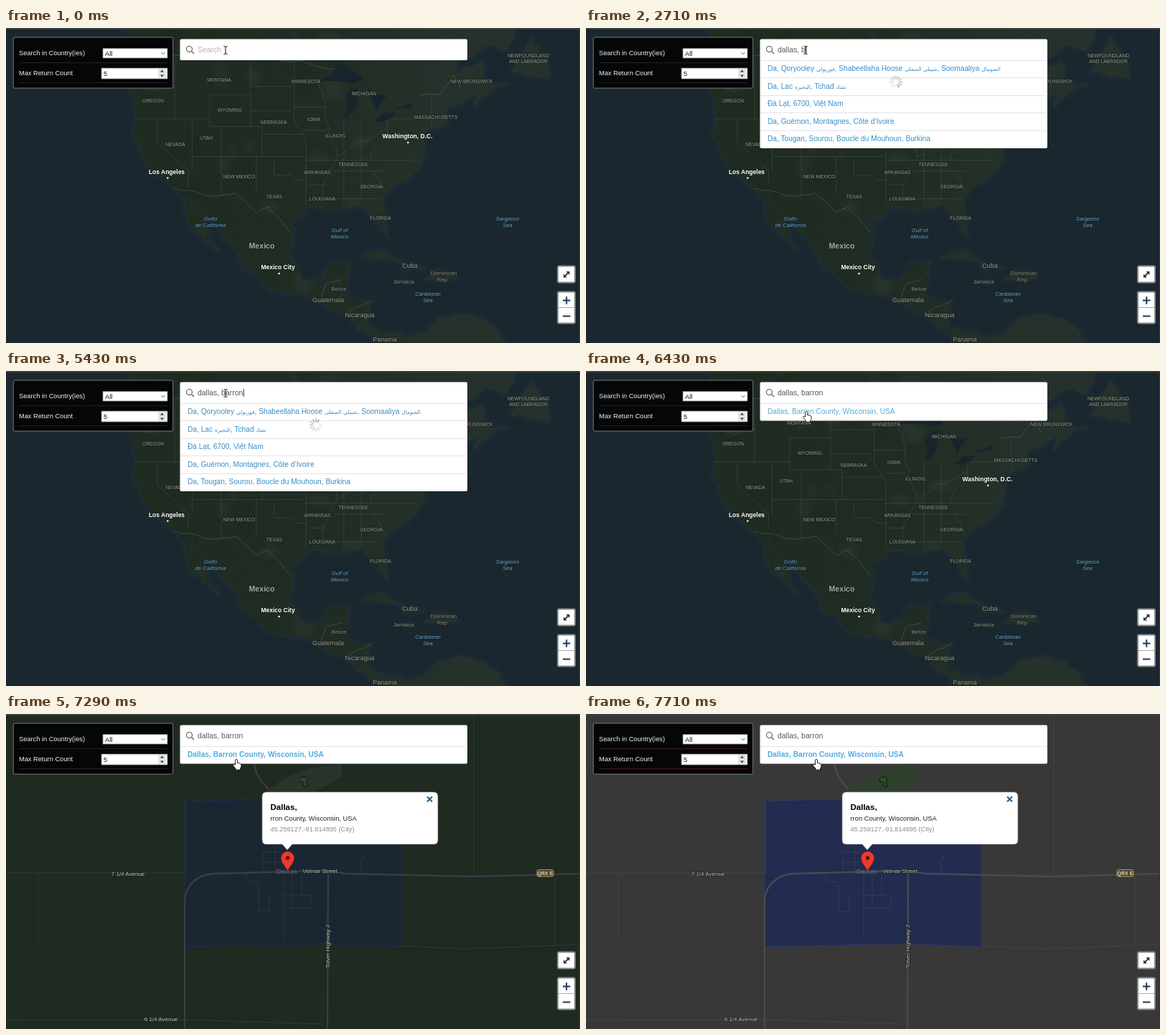
Write an HTML page that moves like this. It is 800x440 px and loops after 8.01 s.

```html
<!DOCTYPE html>
<html lang="en">
<head>
<meta charset="utf-8">
<title>Place search on a map</title>
<style>
html,body{margin:0;width:100%;height:100%;overflow:hidden;background:#1a272f}
svg{display:block;width:800px;height:440px;font-family:Arial,"Liberation Sans",sans-serif}
text{white-space:pre}
.mid{text-anchor:middle}
.halo text{paint-order:stroke;stroke:#1b241e;stroke-width:1.6px;stroke-linejoin:round}
.state{font-size:6.8px;fill:#969a97}
.city{font-size:8.5px;font-weight:bold;fill:#fff}
.country{font-size:10.6px;font-weight:bold;fill:#a3a6a0}
.nation{font-size:9px;fill:#969993}
.small{font-size:7.8px;fill:#858a86}
.sea{font-size:7.7px;font-style:italic;fill:#5fa0dc}
.road{font-size:8px;fill:#c3c6c4}
.row{font-size:10.2px;fill:#3a8fc6}
.arabic{font-family:"DejaVu Sans",sans-serif;font-size:7.5px}
.ui{font-size:9.25px;fill:#f2f2f2}
.line{stroke:#e4e4e7}
</style>
</head>
<body>
<svg viewBox="0 0 800 440">
  <defs>
    <linearGradient id="ground"><stop offset=".2" stop-color="#202b22"/><stop offset=".5" stop-color="#212d24"/><stop offset=".8" stop-color="#27312c"/></linearGradient>
    <filter id="soft" x="-50%" y="-50%" width="200%" height="200%"><feGaussianBlur stdDeviation="4"/></filter>
    <clipPath id="land"><path id="landClip"/></clipPath>
  </defs>
  <g id="continent"></g>
  <g id="town"></g>
  <path d="M0 1H800" stroke="#3b3d3e" stroke-width="2"/>
  <path d="M799.500 0V440" stroke="#30383a"/>

  <g id="popup">
    <path d="M363 109H596Q602 109 602 115V176Q602 182 596 182H399L392 190 385 182H363Q357 182 357 176V115Q357 109 363 109Z" fill="#fff" stroke="#777" stroke-width=".6"/>
    <text x="368.500" y="133.500" font-size="11.5" font-weight="bold">Dallas,</text>
    <text x="368.500" y="149" font-size="9.35" fill="#222">rron County, Wisconsin, USA</text>
    <text x="368.500" y="164" font-size="9.2" fill="#8b8b8b">45.259127,-91.814895 (City)</text>
    <path d="M587 115.500L594 122.500M594 115.500L587 122.500" stroke="#2f6389" stroke-width="2.2"/>
    <path d="M392.500 220C391 213 383.500 209 383.500 201A9 9 0 0 1 401.500 201C401.500 209 394 213 392.500 220Z" fill="#ee3a2d" stroke="#a92118" stroke-width=".6"/>
    <circle cx="392.500" cy="201" r="2.7" fill="#5c0f0c"/>
  </g>

  <rect x="10.200" y="13" width="222.500" height="71" rx="2" fill="#040607" stroke="#777b7d"/>
  <path id="rules" d="M18 48.500H225M18 76.500H225"/>
  <g class="ui">
    <text x="18" y="38">Search in Country(ies)</text><text x="18" y="66">Max Return Count</text>
    <path d="M135 28.500H225V42H135ZM133 56H225V71H133Z" fill="#fff" stroke="#777" stroke-width=".8"/>
    <path d="M212 57H223V70H212Z" fill="#e4e4e4"/>
    <path d="M216.500 34L219 36.500 221.500 34" fill="none" stroke="#555"/>
    <path d="M215 61.500L217.500 58.500 220 61.500ZM215 65.500L217.500 68.500 220 65.500Z" fill="#333"/>
    <text x="138" y="39" style="fill:#111">All</text><text x="136" y="67" style="fill:#111">5</text>
  </g>

  <rect id="sheet" x="242.500" y="15.500" width="400.500" rx="2" fill="#fff"/>
  <g fill="none" stroke="#555" stroke-width="1.1"><circle cx="255.500" cy="29.500" r="4"/><path d="M258.500 32.500L262 36"/></g>
  <text id="query" x="267" y="34" font-size="10.45"></text>
  <path id="caret" stroke="#222" stroke-width=".9"/>
  <g id="list" class="row"></g>
  <g id="match" class="row">
    <path d="M243 45.500H642" class="line"/>
    <text id="matchText" x="253" y="60">Dallas, Barron County, Wisconsin, USA</text>
  </g>
  <g id="spinner"></g>

  <g fill="#fff" stroke="#858a8c" stroke-width="2">
    <rect x="769" y="332.500" width="24" height="23" rx="2"/><rect x="769" y="368.500" width="24" height="44" rx="2"/>
  </g>
  <path d="M770 390.500H792" stroke="#aaa"/>
  <path d="M776 380.500H786.500M781.200 375.200V385.800M776 402.500H786.500" stroke="#1d3a55" stroke-width="2"/>
  <path d="M778 347.500L784.500 341" stroke="#333" stroke-width="1.800"/>
  <path d="M780.500 340H785.500V345ZM777 343.500V348.500H782Z" fill="#333"/>

  <path id="beam" d="M-2.500-5.500Q0-5.500 0-4Q0-5.500 2.500-5.500M0-4.500V4.500M-2.500 5.500Q0 5.500 0 4Q0 5.500 2.500 5.500" fill="none" stroke="#111"/>
  <path id="hand" d="M-1.500 8V1Q0-1 1.500 1V5.500Q2.800 4.400 3.700 6Q5 5.300 5.600 6.700Q7.200 6.500 7 9Q7 11.500 5.500 13V15H-1V13L-4.600 9Q-4.800 6.800-3 7Z" fill="#fff" stroke="#111" stroke-width=".9"/>
</svg>
<script>
const $ = id => document.getElementById(id);
let seed = 7;
const random = () => (seed = seed * 16807 % 2147483647) / 2147483647;
const repeat = (n, make) => Array.from({length: n}, (_, i) => make(i)).join('');

// Web Mercator; points are "degrees west,degrees north"
const project = point => {
  const [west, north] = point.split(',').map(Number);
  return [1186.3 - 8.13 * west, 503.8 - 465.8 * Math.log(Math.tan(Math.PI * (.25 + north / 360)))];
};
// Midpoint displacement turns a straight leg into a natural coast or river
const wander = (a, b, rough) => {
  const dx = b[0] - a[0], dy = b[1] - a[1];
  if (!rough || Math.hypot(dx, dy) < 5) return [b];
  const push = (random() - .5) * rough;
  const mid = [(a[0] + b[0]) / 2 - dy * push, (a[1] + b[1]) / 2 + dx * push];
  return [...wander(a, mid, rough), ...wander(mid, b, rough)];
};
const trace = (lines, rough, end = '') => lines.split('|').map(line => {
  const points = line.trim().split(/\s+/).map(project);
  const full = points.flatMap((p, i) => i ? wander(points[i - 1], p, rough) : [p]);
  return 'M' + full.map(p => p.map(v => v.toFixed(1)).join(' ')).join('L') + end;
}).join('');

const mainland = `128,55 124.5,48 124.3,40.4 120.6,34.6 117.2,32.7 114.8,28 112,25 109.5,23.1 111.5,26.5 114.8,31.7
  109.3,26.3 105.5,21 102,18 95,16 87.5,12.9 83,8.3 80,7.3 78.5,8.8 77.8,3 58,3 62,10.6 71.5,12 77.2,8.6 79.6,9.6
  83.5,10.5 83.2,15 88.3,15.8 87,21.3 90.3,21.1 91.5,18.6 95.5,18.6 97.7,22.5 97.3,27.6 94,29.6 89.3,29.2 84.5,30
  82.7,28 80.5,25.2 81.3,30.5 75.6,35.2 74,40.5 70,41.8 70.3,43.5 64.7,45.4 65.5,43.6 60,46.2 64.5,46.3 64.5,48.9
  70,47.3 65,50.2 60,50.2 55.7,55`;
const islands = `59.3,47.7 53,46.8 55.8,51.5|84.8,22 81,23.1 74.3,20.2 77.5,19.9 79,21.6
  |74.3,18.4 72.5,19.9 68.5,18.6|78.3,18.3 76.3,18 77.2,17.8`;
const lakes = `92,46.7 88,48.7 84.7,46.6 88,46.6|87.8,42 87.8,44.5 85.5,46 86.3,43|84,45.9 80.3,45 82.3,43
  |83.3,41.7 79,42.9 81,41.6|79.6,43.3 76.3,44 76.5,43.4`;
const frontiers = `123,49 95.2,49 89.6,48|75,45 71.5,45 69.2,47.4 67.8,45.6
  |117.1,32.5 111,31.4 106.5,31.8 103,29 101,29.8 97.2,25.9|92.2,14.5 91,17.8 88.3,18.5|87.3,13 83.2,15`;
const rivers = '124,46.2 117,46|92.2,46.7 91.2,43.5 89.1,37 91.4,31|89.1,37 84.8,39.1 80.5,40.6|96.5,42.5 94.5,39|100,34.5 94.5,33.6|82.6,38.4 83.6,36.6|83,35 81,32';
// Straight state lines: "fixed degree:from-to"
const parallels = '42:124-111 41:111-102 37:114-94.6 45:111-104 46:104-96.5 43:104-97 40:102-95 36.5:94.6-76 35:90-81 33:94-91 31:91-82 43.5:96.5-91 40.5:95-91 42:80-75';
const meridians = '117:42-49 114:35-42 109:31.3-41 111:41-45 104:41-49 102:37-41 103:32-37 100:34.5-36.5 94.5:30-39 96.5:42.5-49 88:30-42 85:31-42 80.5:39.7-42 73:41-45';
const straight = [
  parallels.replace(/(\S+):(\S+)-(\S+) ?/g, '$2,$1 $3,$1|'),
  meridians.replace(/(\S+):(\S+)-(\S+) ?/g, '$1,$2 $1,$3|'),
].join('') + '120,42 120,39 114.6,35 114.7,32.7';

const labels = (style, items) => `<g class="${style} mid halo">` + items.split('|').map(item => {
  const [, name, x, y] = item.match(/(.*) (\S+) (\S+)/);
  return `<text x="${x}" y="${y - .5}">${name}</text>`;
}).join('') + '</g>';

const coast = trace(mainland + '|' + islands, .3, 'Z');
$('landClip').setAttribute('d', coast);
$('continent').innerHTML = `
  <path d="M0 0H800V440H0Z" fill="#1a272f"/>
  <path d="${coast}" fill="none" stroke="#1c2b33" stroke-width="9" stroke-linejoin="round"/>
  <path d="${coast}" fill="url(#ground)" stroke="#2d3833" stroke-width=".5"/>
  <g clip-path="url(#land)"><g filter="url(#soft)" opacity=".3">` +
  repeat(45, i => `<ellipse cx="${190 + 400 * random()}" cy="${440 * random()}" rx="${5 + 12 * random()}" ry="${8 + 14 * random()}" fill="${i % 2 ? '#39433a' : '#182a1b'}"/>`) + `
  </g></g>
  <path d="${trace(lakes, .3, 'Z')}" fill="#17242c"/>
  <g fill="none" stroke="#909b90" stroke-width=".8">
    <path d="${trace(straight, 0) + trace(rivers, .3)}" opacity=".22"/>
    <path d="${trace(frontiers, .12)}" opacity=".35"/>
  </g>` +
  labels('state', 'MONTANA 297 75|MINNESOTA 418 77|MICHIGAN 499 94|OREGON 205 104.5|WYOMING 312 117.5|NEBRASKA 373 134|' +
    'IOWA 429 130|ILLINOIS 459 153|UTAH 279 156|NEVADA 236 165|TENNESSEE 484 193|ARKANSAS 434 204|' +
    'NEW MEXICO 325 210|GEORGIA 509 224|TEXAS 374 238|LOUISIANA 441 241|FLORIDA 522 268|MASSACHUSETTS 599 127|' +
    'NEW BRUNSWICK 649 77|NEWFOUNDLAND 728 41|AND LABRADOR 728 49.5') +
  labels('nation', 'Guatemala 449 383|Nicaragua 493 404|Panama 528 438|Cuba 563 335') +
  labels('small', 'Belize 464 367|Jamaica 554 357|Dominican 610 345|Rep 608 354') +
  labels('sea', 'Golfo 285 269|de California 285 278|Gulf of 465 285|Mexico 465 294.5|Sargasso 699 269|Sea 699 278|Caribbean 588 374|Sea 588 383') +
  labels('city', 'Los Angeles 224 204|Washington, D.C. 559.5 154|Mexico City 379 337') +
  labels('country', 'Mexico 356.5 308.5') +
  ['118.2,34', '77,38.9', '99.1,19.4'].map(project).map(([x, y]) => `<circle cx="${x}" cy="${y}" r="1.3" fill="#fff"/>`).join('');

const townMap = (id, ground, zone, edge, road, lane, park) => `<g id="${id}">
  <path d="M0 0H800V440H0Z" fill="${ground}"/>
  <path d="M361 108L392 88 425 76 468 70V88L432 108Z" fill="${park}"/>
  <path d="M249 122L350 119 551 121V325L440 321 249 325Z" fill="${zone}" stroke="${edge}" stroke-dasharray="3 1.5"/>
  <g fill="none" stroke="${lane}">
    <path d="M0 222H250V122M652 0V227M45 223V316M0 428L249 427 440 433M551 324L640 328 800 322M765 227V322M496 222L493 208 500 197"/>
    <path d="M383 193H358V221M358 207H383M375 180V221M332 222L338 233 352 235V276H367V255M387 222V315M399 222V270M387 253H425V271H388M412 222V253" opacity=".75"/>
  </g>
  <path d="M249 440V262C249 242 264 224 290 223L440 219 475 223 650 227 800 223M449 220L448 440M346 69C348 86 356 95 366 105" fill="none" stroke="${road}" stroke-width="2.400"/>
</g>`;
$('town').innerHTML =
  townMap('dark', '#1f2a20', '#1a2733', '#22316f', '#393c48', '#303843', '#2a342b') +
  townMap('grey', '#383838', '#222b50', '#2a3a82', '#484a4c', '#424446', '#2f402d') +
  `<g id="townLabels">
    <path d="M409 91Q411 87 415 88Q420 88 421 92L418 94 420 101H415L414 95 410 95Z" fill="#2c4a2c" stroke="#0d150d"/>` +
  labels('road', '7 1/4 Avenue 170 226|6 1/4 Avenue 216 429|Velmar Street 437.5 222.5') + `
    <g class="road mid halo"><text transform="translate(451 325)rotate(-90)">Tolver Highway J</text></g>
    <rect x="740" y="217.500" width="23" height="9.500" rx="2" fill="#4b432c" stroke="#ab9760"/>
    <text x="751.500" y="225" class="mid" font-size="7" font-weight="bold" fill="#e2d7b4">QRX E</text>
    <text x="377" y="222.500" font-size="9" fill="#667078">D<tspan font-size="7.2">ALLAS</tspan></text>
  </g>`;

$('list').innerHTML = [
  'Da, Qoryooley قوريولي, Shabeellaha Hoose شبيلي السفلى, Soomaaliya الصومال',
  'Da, Lac البحيرة, Tchad تشاد',
  'Đà Lạt, 6700, Việt Nam',
  'Da, Guémon, Montagnes, Côte d’Ivoire',
  'Da, Tougan, Sourou, Boucle du Mouhoun, Burkina',
].map((place, i) => {
  const y = 24.6 * i;
  const text = place.replace(/[\u0600-\u06ff]+( [\u0600-\u06ff]+)*/g, '<tspan class="arabic">$&</tspan>');
  return `<path d="M243 ${Math.floor(45 + y) + .5}H642" class="line"/><text x="253" y="${60 + y}">${text}</text>`;
}).join('');

$('spinner').innerHTML = repeat(12, i =>
  `<path d="M0-4.500V-8.500" stroke="#666" stroke-width="1.400" stroke-linecap="round" opacity="${.12 + i * .045}" transform="rotate(${i * 30})"/>`);

const LOOP = 8010, STEP = 143, phrase = 'dallas, barron', firstWord = 5;
// A quick first burst, then steady slower typing
const keyTime = i => i < firstWord ? 290 + 213 * i : 1570 + 365 * (i - firstWord);
const show = (id, on) => $(id).style.display = on ? '' : 'none';
const ramp = (t, from, to) => Math.min(1, Math.max(0, (t - from) / (to - from)));

function draw(t) {
  const tick = Math.floor((t + 4) / STEP), stepped = tick * STEP;
  const typed = [...phrase].filter((_, i) => keyTime(i) <= t).join('');
  const query = $('query');
  query.textContent = typed || 'Search';
  query.setAttribute('fill', typed ? '#5a5a5a' : '#b3b3b3');
  show('caret', t >= 140 && t < 5860);
  const caretX = 268 + (typed ? query.getComputedTextLength() : 0);
  $('caret').setAttribute('d', `M${caretX} 25V36`);

  const listed = t >= 1290 && t < 5570, matched = t >= 5570;
  show('list', listed);
  show('match', matched);
  $('sheet').setAttribute('height', listed ? 152.5 : matched ? 54 : 29.5);
  show('spinner', t >= 1570 && t < 5570);
  $('spinner').setAttribute('transform', `translate(432 75.5)rotate(${tick * 30})`);

  const down = ramp(stepped, 5720, 6140), aside = ramp(stepped, 6430, 6710);
  const hand = t >= 6000;
  show('hand', hand);
  show('beam', !hand);
  const y = hand ? 39 + 17 * down + 7 * aside : 31 + 20 * down;
  $(hand ? 'hand' : 'beam').setAttribute('transform', `translate(${306 + down + 14 * aside} ${y})`);
  $('matchText').style.fill = hand ? '#56aade' : '';
  $('matchText').style.fontWeight = t >= 6710 ? 'bold' : '';

  show('town', t >= 6860);
  show('popup', t >= 7000);
  $('dark').style.opacity = ramp(stepped, 6720, 7140);
  $('townLabels').style.opacity = ramp(stepped, 6860, 7280);
  $('grey').style.opacity = t < 7570 ? 0 : t < 7710 ? .5 : 1;
  $('rules').setAttribute('stroke', t >= 7710 ? '#4a1717' : '#202324');
}

const start = performance.now();
function frame() {
  draw((performance.now() - start) % LOOP);
  requestAnimationFrame(frame);
}
frame();
</script>
</body>
</html>
```
